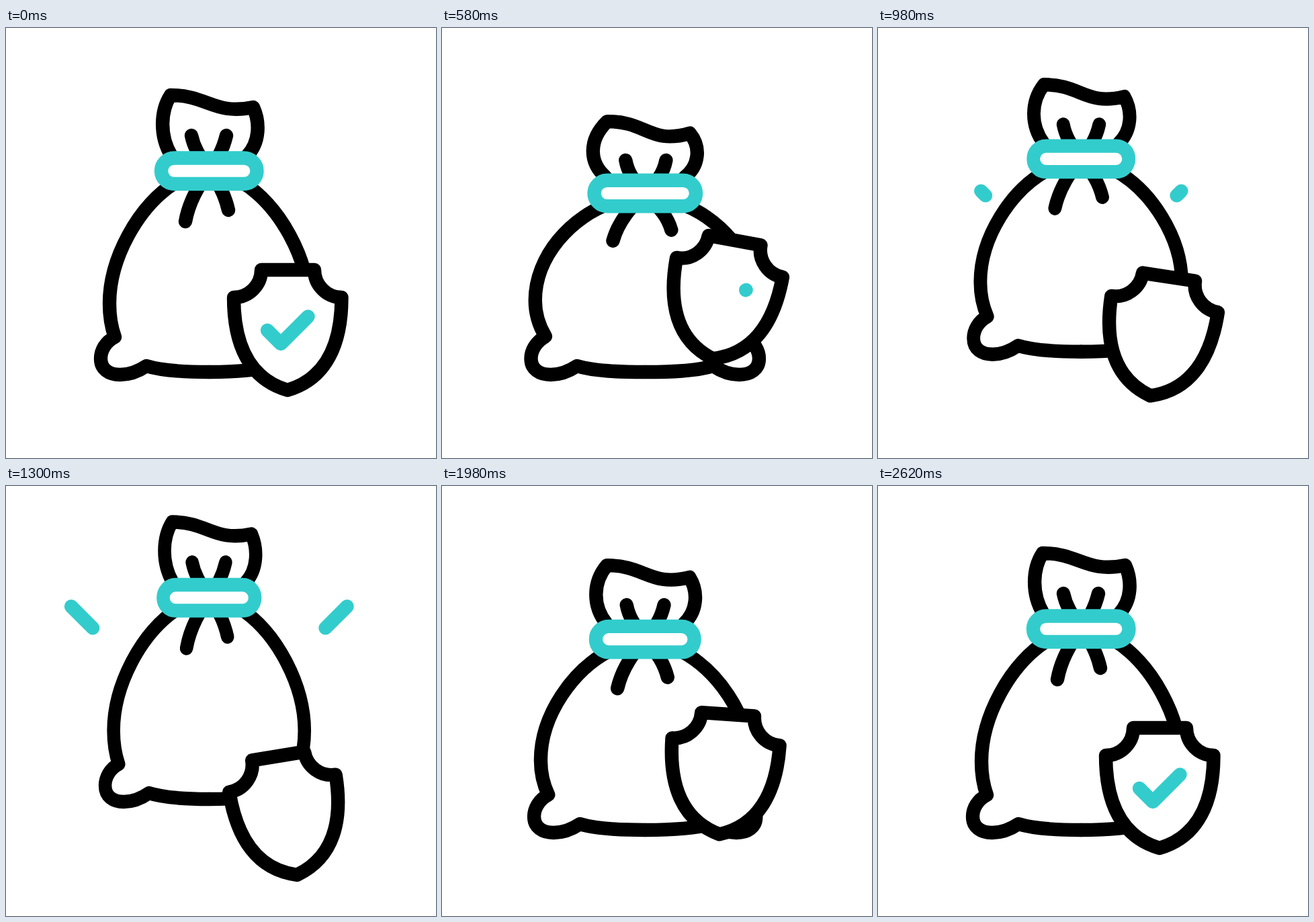
Animation of 640x640 px, one loop 3000 ms. Source, as an HTML page:

```html
<!DOCTYPE html>
<html lang="en">
<head>
<meta charset="utf-8">
<title>Protected savings</title>
<style>
  html, body { margin: 0; width: 100%; height: 100%; overflow: hidden; background: #fff; }
  svg { display: block; width: 100%; height: 100%; }
  path, rect { fill: none; stroke: #000; stroke-width: 20.4; stroke-linecap: round; stroke-linejoin: round; }
  .teal { stroke: #3cc; }
  .white { fill: #fff; }
</style>
</head>
<body>
<svg viewBox="0 0 640 640">
  <path id="rayL" class="teal"/>
  <path id="rayR" class="teal"/>
  <g id="bag">
    <path id="side"/>
    <use href="#side" transform="matrix(-1 0 0 1 604.4 0)"/>
    <path id="neck"/>
    <path id="ties"/>
    <rect id="knot" class="teal white" height="38.5" rx="19.25"/>
  </g>
  <g id="shield">
    <path class="white" d="M380 360H459A41 41 0 0 0 499.5 401C499.5 470 477 522 419 539C361 522 339 470 339 401A41 41 0 0 0 380 360Z"/>
    <path id="check" class="teal" pathLength="100" d="M389 450L409 470L449.5 429.5"/>
  </g>
</svg>
<script>
const el = id => document.getElementById(id);
const set = (id, attrs) => {
  for (const name in attrs) el(id).setAttribute(name, attrs[name]);
};
const lerp = (a, b, u) => a + (b - a) * u;
const ease = (t, from, to) => {
  const u = Math.min(1, Math.max(0, (t - from) / (to - from)));
  return (1 - Math.cos(Math.PI * u)) / 2;
};

// Eased value along [time, value] keys
const track = (t, keys) => {
  let value = keys[0][1];
  for (let i = 1; i < keys.length; i++) {
    if (t > keys[i - 1][0])
      value = lerp(keys[i - 1][1], keys[i][1], ease(t, keys[i - 1][0], keys[i][0]));
  }
  return value;
};

// Bag outlines: [relaxed, squashed]
const outlines = {
  side: [
    "M255 228C195 265 154 345 154 410C154 428 157 446 162 460C148 467 141 480 141 492C141 508 153 516 170 516C184 516 197 511 209 503C235 511 270 512 302 512",
    "M255 263C192 281 137 340 137 405C137 425 143 443 153 459C139 467 131.5 480 131.5 492C131.5 508 144 516 161 516C175 516 188 511 200 503C226 511 265 512 302 512"
  ],
  neck: [
    "M246 190C228 160 230 123 245 100C300 100 310 130 368 118C378 140 378 170 359 190",
    "M243 225C218 205 216 172 246 143.5C305 143 310 179 369 161C387 182 383 210 361 226"
  ],
  ties: [
    "M276 160C281 185 296 200 303 212S324 240 331 271M328 160C322 185 311 200 303 212S274 250 267 288",
    "M273 201C278 228 293 236 302 249S334 275 342.5 304M334 201C329 228 312 238 302 249S263 285 253 320"
  ]
};
const morph = ([a, b], k) => {
  const ends = b.match(/[\d.]+/g);
  let i = 0;
  return a.replace(/[\d.]+/g, n => lerp(+n, +ends[i++], k).toFixed(2));
};

function draw(t) {
  const squash = track(t, [[200, 0], [680, 1], [700, 1], [1205, -0.13], [1660, 1], [2240, 0]]);
  const jump = track(t, [[700, 0], [1205, 1], [1660, 0]]);
  const lift = -51.5 * jump;
  const narrow = 1 - 0.045 * jump;

  for (const id in outlines) set(id, { d: morph(outlines[id], squash) });
  set("knot", {
    x: lerp(231, 226, squash),
    y: lerp(193.5, 230.5, squash),
    width: lerp(142.5, 152.5, squash)
  });
  set("bag", { transform: `translate(${302.2 * (1 - narrow)} ${lift}) scale(${narrow} 1)` });

  // The shield moves against the bag
  const drop = track(t, [[200, 0], [680, -50.5], [700, -50.5], [1205, 51.5], [1660, -49], [2240, 0]]);
  const tilt = track(t, [[200, 0], [700, 12], [860, 12], [1333, -9.5], [1800, 5.5], [2300, 0]]);
  set("shield", { transform: `translate(0 ${drop}) rotate(${tilt} 419.5 449.5)` });

  const erased = t < 1400 ? 99.9 * ease(t, 200, 600) : 0;
  const drawn = t < 1400 ? 100 : 100 * ease(t, 2200, 2620);
  set("check", {
    "stroke-dasharray": `${drawn - erased} 300`,
    "stroke-dashoffset": -erased,
    visibility: t > 600 && t < 2210 ? "hidden" : "visible"
  });

  const outer = lerp(160, 88, ease(t, 870, 1430));
  const inner = lerp(160, 88, ease(t, 1010, 1650));
  const rise = 103 + 0.45 * lift;
  const visibility = t > 870 && t < 1640 ? "visible" : "hidden";
  const ray = at => `M${at(outer)} ${outer + rise}L${at(inner)} ${inner + rise}`;
  set("rayL", { d: ray(x => x), visibility });
  set("rayR", { d: ray(x => 604.6 - x), visibility });
}

function tick() {
  draw(performance.now() % 3000);
  requestAnimationFrame(tick);
}
tick();
</script>
</body>
</html>
```
